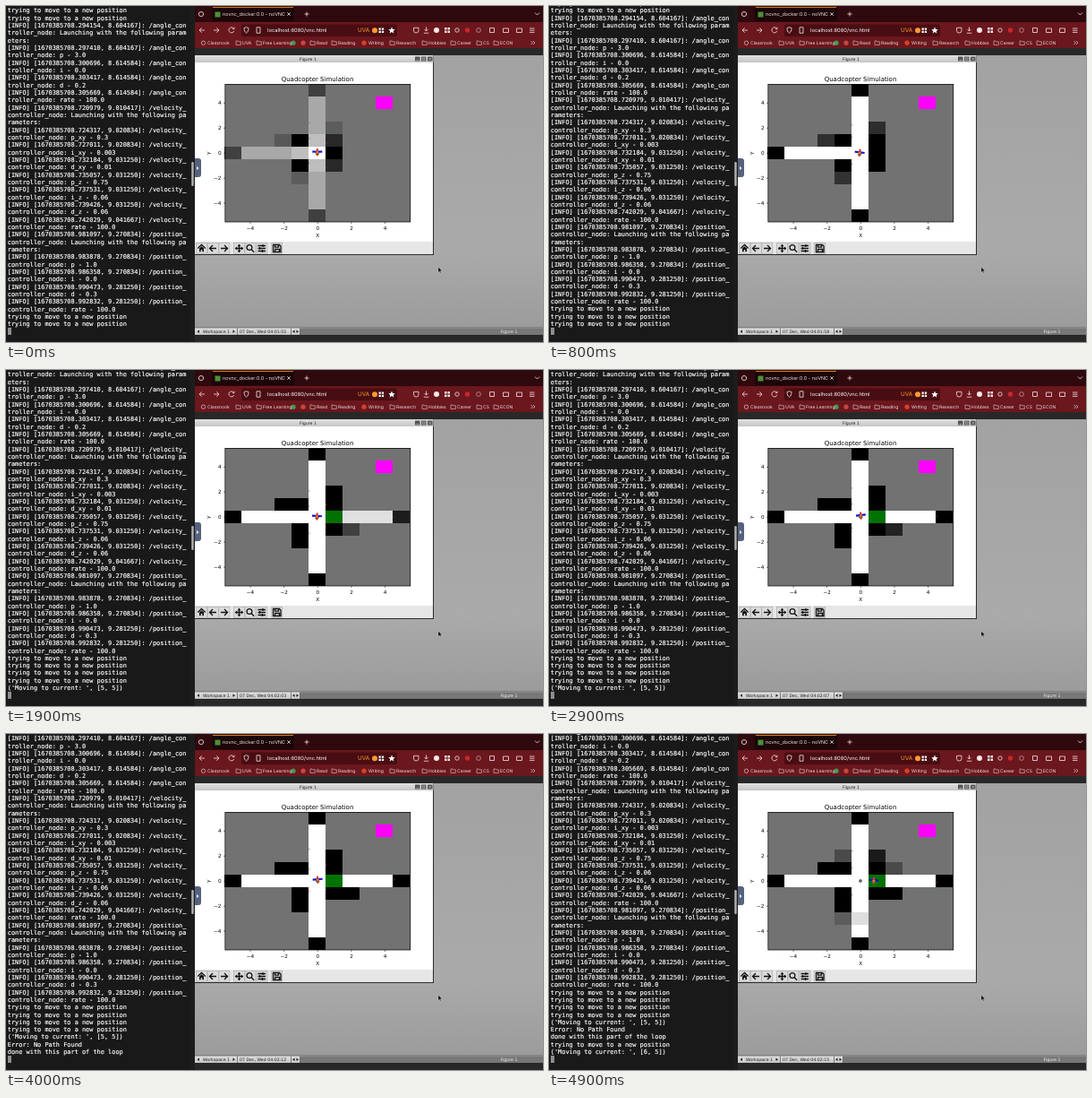
Animation, 600 px wide and 375 px high, one loop 5000 ms. Source, as an HTML page:

```html
<!DOCTYPE html>
<html lang="en">
<head>
<meta charset="utf-8">
<title>Quadcopter Simulation</title>
<style>
html, body { margin: 0; width: 100%; height: 100%; overflow: hidden; background: #191919; }
svg { display: block; width: 600px; height: 375px; }
text { text-rendering: geometricPrecision; white-space: pre; }
.term { font: 6.92px "DejaVu Sans Mono", monospace; fill: #fff; stroke: #fff; stroke-width: .16; }
.ui { font: 5px Inter, sans-serif; fill: #f0dfe0; }
.wm { font: 4.7px "DejaVu Sans", sans-serif; fill: #222; }
.plot { font: 5.7px "DejaVu Sans", sans-serif; fill: #000; }
.mid { text-anchor: middle; }
.end { text-anchor: end; }
.icon { fill: none; stroke: #e6cfd1; stroke-width: .9; }
.tool { fill: none; stroke: #111; stroke-width: 1.3; }
#cells { shape-rendering: crispEdges; }
</style>
</head>
<body>
<svg viewBox="0 0 600 375">
  <defs>
    <linearGradient id="desk" x1="0" y1="0" x2="0" y2="1">
      <stop offset="0" stop-color="#a2a2a2"/><stop offset=".7" stop-color="#aaa"/><stop offset="1" stop-color="#9a9a9a"/>
    </linearGradient>
    <linearGradient id="bar" x1="0" y1="0" x2="0" y2="1">
      <stop offset="0" stop-color="#e0e0e0"/><stop offset="1" stop-color="#c6c6c6"/>
    </linearGradient>
  </defs>

  <!-- terminal -->
  <rect width="211" height="375" fill="#191919"/>
  <g id="term" class="term"></g>
  <rect x="2" y="359" width="4" height="8" fill="#8e8e8e"/>
  <rect x="206" width="5" height="375" fill="#1c1c1c"/>
  <rect x="207.3" y="174" width="2.4" height="27" rx="1.2" fill="#b4b4b4"/>

  <!-- browser -->
  <rect x="211" width="389" height="18" fill="#2e090d"/>
  <rect x="211" y="18" width="389" height="29" fill="#6a171d"/>
  <rect x="230" y="1.5" width="92" height="15.5" rx="2" fill="#1b0608"/>
  <rect x="231" y="1" width="90" height="1" fill="#d87a1c"/>
  <rect x="233.5" y="6.5" width="6" height="6" fill="#4f8f3a"/>
  <text class="ui" x="242" y="11" style="font-size:5.5px">novnc_docker:0.0 - noVNC</text>
  <rect x="263" y="20.5" width="174" height="13.5" rx="2" fill="#480d12"/>
  <text class="ui" x="292" y="29.3" style="font-size:5.8px;fill:#fff">localhost:8080/vnc.html</text>
  <text class="ui" x="393" y="29.4" style="font-size:6.4px;fill:#ff9a2e">UVA</text>
  <circle cx="412" cy="27.2" r="3" fill="#ff9a2e"/>
  <path d="M416.500 24.500h2.300v2.300h-2.300zM419.800 24.500h2.300v2.300h-2.300zM416.500 27.800h2.300v2.300h-2.300zM419.800 27.800h2.300v2.300h-2.300zM431 23.500l1.100 2.500 2.600.2-2 1.700.7 2.600-2.400-1.400-2.400 1.400.7-2.600-2-1.700 2.600-.2z" fill="#fff"/>
  <g class="icon">
    <path d="M314.300 7.300l3.400 3.400m0-3.400l-3.400 3.400M333.500 9h5m-2.500-2.500v5M591 7.500l2.500 2.500 2.500-2.500"/>
    <path d="M222 27h-6m2.700-2.700L216 27l2.700 2.700M232 27h6m-2.700-2.700L238 27l-2.700 2.700M254.300 25a3 3 0 1 0 .5 2.800M255 23.600v2h-2"/>
    <path d="M266 24.500l2.500-.8 2.500.8c0 3-.8 4.500-2.500 5.700-1.700-1.200-2.500-2.700-2.500-5.700zM280 23.800h4v6.400h-4z"/>
    <path d="M455.500 24.300h5.500v3a2.700 2.700 0 0 1-5.500 0zM469.500 23.500v4.500m-2-2l2 2 2-2M466.800 30.200h5.500M540.500 24.500h5v5h-5zM555.500 25h6v4.500h-6zM570.500 25h6v4.500h-6zM585 25h5.500m-5.500 2.200h5.500m-5.500 2.200h5.500"/>
    <circle cx="218" cy="9" r="2.600"/>
    <circle cx="504" cy="27" r="2.200"/><circle cx="528" cy="27" r="2.400" opacity=".6"/>
    <path d="M586.500 39l2 2-2 2m2.500-4l2 2-2 2" stroke-width=".7"/>
  </g>
  <circle cx="481" cy="27" r="3" fill="#f4e8e8"/>
  <path d="M490 24h2.500v2.500H490zM493.500 24h2.500v2.500h-2.500zM490 27.500h2.500v2.500H490zM493.500 27.500h2.500v2.500h-2.500z" fill="#f4e8e8"/>
  <circle cx="515.500" cy="27" r="2.800" fill="#c8272c"/>
  <circle cx="321" cy="41.200" r="2.600" fill="#3f9a55"/>
  <circle cx="332" cy="41.200" r="2.600" fill="#c8473f"/>
  <g id="marks" class="ui"></g>

  <!-- remote desktop -->
  <rect x="211" y="47" width="389" height="328" fill="#282828"/>
  <rect x="211" y="55" width="389" height="312" fill="url(#desk)"/>
  <rect x="211" y="55" width="267" height="223" fill="#2c2c2c"/>
  <rect x="211" y="55" width="266.500" height="8" fill="url(#bar)"/>
  <text class="wm mid" x="337.5" y="60.800">Figure 1</text>
  <path d="M457 56.500h5.500v5h-5.500zM464 56.500h5.500v5h-5.500zM471 56.500h5.500v5h-5.500z" fill="#555"/>
  <path d="M458.500 60.300h2.500M465.500 57.800h2.500v2.400h-2.500zM472.500 57.800l2.500 2.500m0-2.500l-2.500 2.500M213 60.500h3v-2.500h-3z" fill="none" stroke="#ccc" stroke-width=".6"/>
  <rect x="211" y="63" width="266" height="200" fill="#fff"/>
  <rect x="211" y="263" width="266" height="14" fill="#e6e6e6"/>
  <g id="buttons" fill="#dadada" stroke="#a6a6a6" stroke-width=".6"></g>
  <g class="tool">
    <path d="M214.300 270.500l4.200-4 4.200 4"/>
    <path d="M216 270.500v3.800h1.700v-2.300h1.600v2.300h1.700v-3.800l-2.500-2.300z" fill="#111" stroke="none"/>
    <path d="M235 270.500h-7.500m3.500-3.500l-3.500 3.500 3.500 3.500M240 270.500h7.500m-3.500-3.500l3.500 3.500-3.500 3.500"/>
    <path d="M256 270.500h9m-4.500-4.500v9"/>
    <path d="M256 270.500l2.200-2v4zM265 270.500l-2.200-2v4zM260.500 266l-2 2.200h4zM260.500 275l-2-2.200h4z" fill="#111" stroke="none"/>
    <circle cx="272" cy="269.500" r="2.900"/>
    <path d="M274.200 271.700l3 3M281.500 267.500h8.500m-8.500 3h8.500m-8.500 3h8.500"/>
    <path d="M287 266v3m-3.500 0v3m3 0v3"/>
    <path d="M298.500 266.500h7l1.500 1.500v6.500h-8.500zM300.500 266.500v2.700h4v-2.700M300.500 274.500v-3h5v3"/>
  </g>
  <path d="M211 170h4a3 3 0 0 1 3 3v15a3 3 0 0 1-3 3h-4z" fill="#56627d"/>
  <path d="M213 178.800l2.500 2.200-2.500 2.200z" fill="#e6e8ee"/>
  <path d="M483 291.500v5.800l1.400-1.300.9 2 .8-.4-.9-1.900h1.900z" stroke="#eee" stroke-width=".3"/>

  <!-- figure -->
  <g id="cells"></g>
  <path id="hits" stroke="#e02020" stroke-width="1"/>
  <circle cx="348" cy="164" r="1.4" fill="#888" stroke="#333" stroke-width=".7"/>
  <g id="drone">
    <path d="M-5.500-.6H5.500" stroke="#1414d8" stroke-width="2.200"/>
    <path d="M-2 1.800H2" stroke="#27962c" stroke-width="1.500"/>
    <path d="M0-4V4" stroke="#d8342c" stroke-width="2.200"/>
    <path d="M-1.400 0H1.400" stroke="#e08a20" stroke-width="1.800"/>
  </g>
  <rect x="244.8" y="87.4" width="207" height="153.600" fill="none" stroke="#000" stroke-width=".7"/>
  <g id="axes" class="plot"></g>
  <text class="plot mid" x="348" y="83.600" style="font-size:7px">Quadcopter Simulation</text>
  <text class="plot mid" x="348.3" y="257.500">X</text>
  <text class="plot mid" transform="translate(228.500 164.200) rotate(-90)">Y</text>

  <!-- task bar -->
  <rect x="211" y="359" width="389" height="8" fill="url(#bar)"/>
  <rect x="328.500" y="359.500" width="271.500" height="7.500" fill="#777"/>
  <path d="M211 359h389M258.500 359.500v7.500M318.500 359.500v7.500M328.500 359.500v7.500" stroke="#555" stroke-width=".7"/>
  <path d="M216 361.500v3.600l-2.500-1.800zM253.500 361.500v3.600l2.500-1.800zM322.500 361.500v3.600l-2.500-1.800zM324.500 361.500v3.600l2.500-1.800z" fill="#222"/>
  <text class="wm mid" x="235" y="365">Workspace 1</text>
  <text class="wm" id="clock" x="261" y="365"></text>
  <text class="wm mid" x="562" y="365" style="fill:#eee">Figure 1</text>
</svg>

<script>
const LOOP = 5000, STEP = 100, ROW = 8.33, COLS = 48;
const CX = 348.3, CY = 164.2, CW = 18.82, CH = 13.97;
const $ = id => document.getElementById(id);

function add(parent, tag, attrs, text) {
  const el = document.createElementNS("http://www.w3.org/2000/svg", tag);
  for (const k in attrs) el.setAttribute(k, attrs[k]);
  if (text) el.textContent = text;
  return parent.appendChild(el);
}

// Terminal: wrapped log lines, then lines printed while the loop runs
const TRY = "trying to move to a new position";
const LOG = `294154 8.604167 angle
297410 8.604167 angle p - 3.0
300696 8.614584 angle i - 0.0
303417 8.614584 angle d - 0.2
305669 8.614584 angle rate - 100.0
720979 9.010417 velocity
724317 9.020834 velocity p_xy - 0.3
727011 9.020834 velocity i_xy - 0.003
732184 9.031250 velocity d_xy - 0.01
735057 9.031250 velocity p_z - 0.75
737531 9.031250 velocity i_z - 0.06
739426 9.031250 velocity d_z - 0.06
742029 9.041667 velocity rate - 100.0
981097 9.270834 position
983878 9.270834 position p - 1.0
986358 9.270834 position i - 0.0
990473 9.281250 position d - 0.3
992832 9.281250 position rate - 100.0`;
const PRINTS = [
  [200, TRY], [1000, TRY], [1000, "('Moving to current: ', [5, 5])"],
  [3300, "Error: No Path Found"], [3300, "done with this part of the loop"],
  [4100, TRY], [4100, "('Moving to current: ', [6, 5])"]
];
const lines = [TRY, TRY];
for (const entry of LOG.split("\n")) {
  const [us, sim, node, ...msg] = entry.split(" ");
  const body = msg.join(" ") || "Launching with the following parameters:";
  const full = `[INFO] [1670385708.${us}, ${sim}]: /${node}_controller_node: ${body}`;
  lines.push(...full.match(new RegExp(`.{1,${COLS}}`, "g")));
}
lines.push(TRY, TRY);
const rowText = (s, i) => add($("term"), "text", { x: 1.8, y: 7.3 + i * ROW }, s);
lines.forEach(rowText);
const printed = PRINTS.map(([at, s], i) => ({ at, el: rowText(s, lines.length + i) }));

// Bookmarks: label and left edge
[["Classnook", 225], ["UVA", 264], ["Free Learning", 287], ["Read", 347], ["Reading", 371],
 ["Writing", 405], ["Research", 436], ["Hobbies", 472], ["Career", 504], ["CS", 533], ["ECON", 552]
].forEach(([label, x], i) => {
  const g = $("marks");
  if (!i) add(g, "circle", { class: "icon", cx: x - 4.5, cy: 41.2, r: 2.2, style: "stroke-width:.7" });
  else if (label == "Writing") add(g, "circle", { cx: x - 5, cy: 41.2, r: 2.6, fill: "#d8402c" });
  else add(g, "path", { class: "icon", d: `M${x - 7} 39h2l.7.8h2.600v3.600h-5.300z`, style: "stroke-width:.6" });
  add(g, "text", { x, y: 43 }, label);
});

for (const x of [218.5, 231.3, 243.8, 260.5, 273, 285.8, 302.7]) {
  add($("buttons"), "rect", { x: x - 6, y: 264.3, width: 12, height: 12 });
}

// Axis ticks
for (let v = -4; v <= 4; v += 2) {
  const x = CX + v * CW, y = CY - v * CH, label = String(v).replace("-", "\u2212");
  add($("axes"), "path", { d: `M${x} 241v2M245 ${y}h-2`, stroke: "#000", "stroke-width": .5 });
  add($("axes"), "text", { class: "mid", x, y: 249.7 }, label);
  add($("axes"), "text", { class: "end", x: 240.5, y: y + 2 }, label);
}

// Occupancy map: each cell has alternating times and grey levels
const cells = [];
function rect(x, y, fill) {
  return add($("cells"), "rect", {
    x: CX - .8 + (x - .5) * CW, y: CY - (y + .5) * CH, width: CW, height: CH, fill
  });
}
const cell = (x, y, ...keys) => cells.push({ el: rect(x, y), keys });

add($("cells"), "rect", { x: 244.8, y: 87.4, width: 207, height: 153.6, fill: "#727272" });
rect(4, 4, "#f0f");
const goal = rect(1, 0, "#000");
cell(0, 0, 0, 255);
for (let i = 1; i <= 5; i++) {
  const keys = i == 5 ? [0, 64, 400, 24, 650, 0]
    : i == 1 ? [0, 190, 400, 255] : [0, 168, 400, 220, 700, 255];
  cell(0, i, ...keys);
  cell(-i, 0, ...keys);
  cell(0, -i, ...keys, ...(i == 3 ? [4600, 255, 4900, 222] : []));
  if (i == 5) cell(i, 0, 1100, 114, 1900, 28, 2200, 0);
  else if (i > 1) cell(i, 0, 1100, 114, 1900, 224, 2200, 255);
}
cell(-1, 1, 0, 0);
cell(-1, -1, 0, 0);
cell(1, 1, 0, 40, 300, 0);
cell(1, -1, 0, 40, 300, 0);
cell(1, 2, 0, 92, 400, 64, 1100, 30, 1800, 0, 4600, 0, 4900, 26);
cell(-2, 1, 0, 88, 400, 60, 1100, 38, 1800, 0);
cell(-1, -2, 0, 92, 400, 68, 1100, 36, 1800, 0);
cell(2, -1, 1100, 114, 1900, 64, 2900, 34, 3800, 0);
cell(-1, 2, 4600, 114, 4900, 74);
cell(2, 1, 4600, 114, 4900, 74);
cell(-1, -3, 4600, 114, 4900, 92);

function lerpKeys(k, t) {
  if (t <= k[0]) return k[1];
  for (let i = 2; i < k.length; i += 2) {
    if (t <= k[i]) return k[i - 1] + (k[i + 1] - k[i - 1]) * (t - k[i - 2]) / (k[i] - k[i - 2]);
  }
  return k[k.length - 1];
}

// Small range readings along the corridor walls
const noise = n => { const s = Math.sin(n * 12.9898) * 43758.5453; return s - Math.floor(s); };
function hits(n, t) {
  let d = "";
  for (const [x, y] of [[-.5, 1], [.5, 1], [-.5, -1], [.5, -1], [-.5, 2.4]]) {
    const jit = (noise(n + x * 7 + y * 3) - .5) * .7;
    d += `M${CX + x * CW - .5} ${CY - (y + jit) * CH}h.9`;
  }
  if (t >= 1000) d += `M${CX + 4.5 * CW} ${CY - (noise(n) - .3) * .5 * CH}h.9`;
  return d;
}

function draw(now) {
  const t = Math.floor(now % LOOP / STEP) * STEP;
  let shown = 0;
  for (const p of printed) {
    const on = t >= p.at;
    p.el.style.display = on ? "" : "none";
    shown += on;
  }
  $("term").setAttribute("transform", `translate(0 ${-shown * ROW})`);

  for (const c of cells) {
    const v = Math.round(lerpKeys(c.keys, t));
    c.el.setAttribute("fill", `rgb(${v},${v},${v})`);
  }
  goal.setAttribute("fill", t < 1000 ? "#000" : t < 1300 ? "#0ff" : "#007200");

  // Hover sway, then the flight to the next cell
  const sway = Math.sin(t / 700), u = Math.min(1, Math.max(0, (t - 4100) / 900));
  const x = CX - .5 - .8 * sway + .86 * CW * u * u * (3 - 2 * u);
  $("drone").setAttribute("transform", `translate(${x} ${CY - 1 + .8 * sway}) rotate(${8 * sway})`);
  $("hits").setAttribute("d", hits(t / STEP, t));

  const sec = Math.floor(55.7 + t * .00408), pad = v => String(v).padStart(2, "0");
  $("clock").textContent = `07 Dec, Wed 04:${pad(1 + Math.floor(sec / 60))}:${pad(sec % 60)}`;
}

const start = performance.now();
function tick() {
  draw(performance.now() - start);
  requestAnimationFrame(tick);
}
tick();
</script>
</body>
</html>
```
